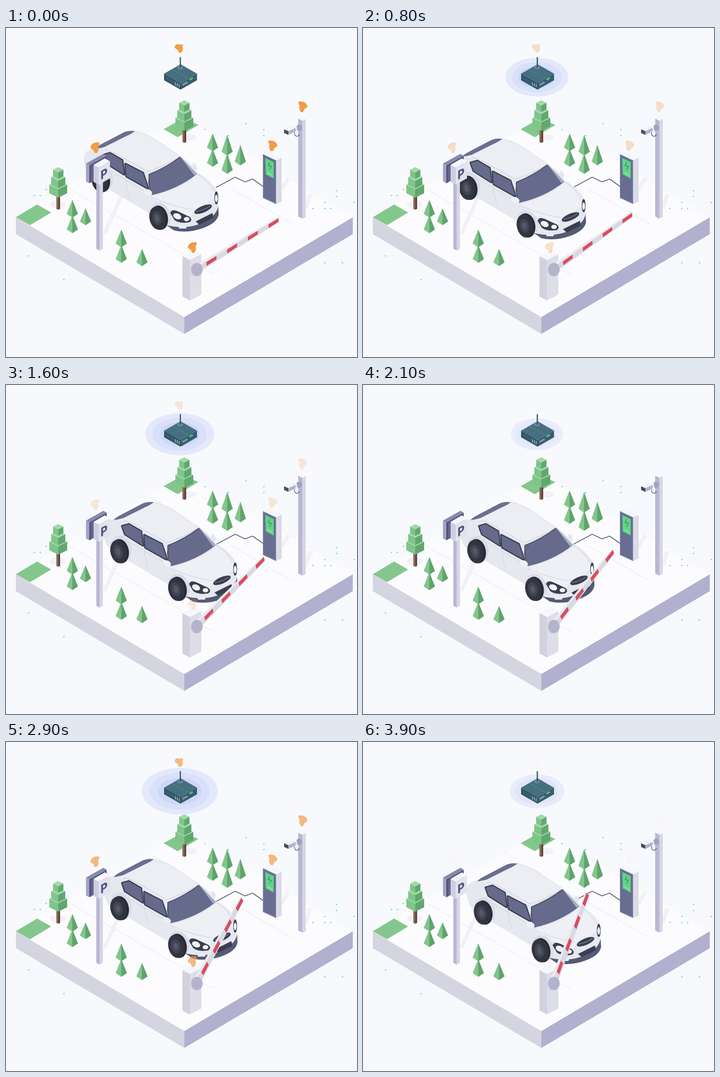
Recreate the animation shown at these times as an HTML page. Size 746 px wide and 699 px high, loop 4 s.

```html
<!DOCTYPE html>
<html lang="en">
<head>
<meta charset="utf-8">
<title>Smart parking</title>
<style>
html, body { margin: 0; width: 100%; height: 100%; overflow: hidden; background: #f7f9fd; }
svg { display: block; width: 746px; height: 699px; }
</style>
</head>
<body>
<svg viewBox="0 0 746 699" xmlns="http://www.w3.org/2000/svg" stroke-linejoin="round">
  <defs><clipPath id="top"><rect y="35" width="746" height="664"/></clipPath></defs>
  <g id="ground"></g>
  <g id="rings"></g>
  <g id="scene"></g>
  <g id="car"></g>
  <g id="posts"></g>
  <g id="arm"></g>
  <g id="hub"></g>
  <g id="waves" clip-path="url(#top)"></g>
</svg>
<script>
const $ = id => document.getElementById(id);
const poly = (pts, fill, more = '') => `<polygon points="${pts}" fill="${fill}" ${more}/>`;
const shape = (d, fill) => `<path d="${d}" fill="${fill}"/>`;
const line = (d, color, w) => `<path d="${d}" fill="none" stroke="${color}" stroke-width="${w}"/>`;
const oval = (x, y, rx, ry, fill, tilt = 0) =>
  `<ellipse cx="${x}" cy="${y}" rx="${rx}" ry="${ry}" fill="${fill}" transform="rotate(${tilt} ${x} ${y})"/>`;
const times = (n, f) => Array.from({ length: n }, (_, i) => f(i)).join('');

// isometric box: (x, y) is the front top corner, a and b the left and right widths, k the slope
function box(x, y, a, b, h, [left, right, top], k = .57) {
  const l = y - a * k, r = y - b * k;
  return poly([x - a, l, x, y, x, y + h, x - a, l + h], left) +
    poly([x, y, x + b, r, x + b, r + h, x, y + h], right) +
    poly([x - a, l, x, y, x + b, r, x + b - a, l - b * k], top);
}

let seed = 7;
const rand = () => (seed = seed * 16807 % 2147483647) / 2147483647;
const dots = (x, y, cols, rows) => times(cols * rows, i => {
  const lit = rand() < .1, r = lit ? 1.5 : 1;
  return oval(x + i % cols * 12.5, y + Math.floor(i / cols) * 12.7, r, r, lit ? '#5fe3c3' : '#eceff5');
});

const GREEN = ['#7fc589', '#61a770', '#a3d9a8'], WOOD = ['#8b6a57', '#60463c', '#60463c'];
const LILAC = ['#b9b7d3', '#d7d6e5', '#f6f6fa'], GRASS = '#84c78d', SHADE = '#f1f1f6';

$('ground').innerHTML =
  dots(48, 484, 9, 5) + dots(640, 448, 9, 6) +
  box(379, 614, 358, 358, 36, ['#d5d5e1', '#b1b0ce', '#fcfcfe'], .592) +
  dots(48, 343, 4, 3) + dots(423, 203, 11, 5) + dots(640, 320, 9, 6) +
  line('M136 343L376 480M302 236L330 252M476 340L612 418M416 512L442 523', SHADE, 2) +
  line('M250 346L209 438M647 353L637 384M600 319L586 343', SHADE, 8) +
  oval(110, 375, 17, 8, SHADE) + oval(391, 232, 14, 7, SHADE) +
  poly('21,402 66,375 96,392 51,419', GRASS) + poly('335,215 376,192 409,206 365,232', GRASS);

$('rings').innerHTML = oval(0, 0, 85, 52, '#e3e8fa') + oval(0, 0, 67, 41, '#d9e0f9') + oval(0, 0, 49, 30, '#cdd7f8');

const tree = (x, y) => box(x, y + 57, 4, 4, 28, WOOD, .4) + times(3, i => {
  const w = 19 - 4 * i;
  return box(x, y + 32 - 16 * i + w / 2, w, w, 18 - 2 * i, GREEN, .5);
});
const cone = (x, y, h) => poly([x, y, x - 12, y + h - 8, x, y + h], '#83c58c') +
  poly([x, y, x + 12, y + h - 8, x, y + h], '#5fa46d');
const pair = (x, y, h) => cone(x, y, h) + cone(x, y + h - 5, h);

$('scene').innerHTML =
  // router
  box(371, 117, 35, 35, 14, ['#2f5566', '#365e6e', '#466f80']) +
  line('M353 87L388 107', '#5d8595', 1) +
  line(times(6, i => `M${341 + i * 3} ${104 + i * 1.7}v6`), '#4d7283', 1) +
  line('M360 115v7M364 117v7M368 119v7', '#b7c9d1', 1.5) +
  line('M375 121L386 115', '#7c98a3', 4) + line('M390 110L397 106', '#66bf72', 3.5) +
  oval(370, 84, 6, 4, '#648a9b') + line('M370.500 62V84', '#384e63', 2.5) +
  tree(111, 301) + tree(379, 159) +
  pair(439, 224, 38) + pair(470, 227, 44) + cone(498, 248, 44) +
  pair(141, 365, 38) + cone(169, 383, 36) + pair(245, 428, 38) + cone(289, 469, 37) +
  line('M446 339L487 317L508 327L524 321L547 337', '#5a5d75', 1.8);

const GLASS = '#666a8b', FRAME = '#3a3e50', LAMP = '#f1f4f7', SEAM = '#d6dae4';
const wheel = (x, y) => oval(x + 4, y - 1, 18, 26, '#282b37', -12) + oval(x, y, 17, 25, '#32353f', -12) +
  oval(x - 1, y, 10, 15, '#414554', -12) + oval(x - 1, y, 5, 8, '#53576a', -12);
const frame = `stroke="${FRAME}" stroke-width="5" paint-order="stroke"`;

$('car').innerHTML =
  shape('M206 304Q207 289 231 284L291 251Q302 246 319 249Q336 252 358 266L411 302Q436 319 447 338Q472 351 484 369Q492 381 491 404L492 424Q490 440 466 450Q430 465 398 460L345 424L224 352Q206 336 206 304Z', '#e5e8ef') +
  shape('M232 286L297 254Q313 249 333 256Q376 278 409 304L343 339L268 298Q252 289 232 286Z', '#eceef4') +
  line('M250 288Q266 291 288 305L342 335Q376 323 407 305', SEAM, 2) +
  shape('M229 287Q232 282 244 276L288 253Q299 247 314 249Q307 255 295 260L249 283Q238 286 229 287Z', '#6b6e90') +
  poly('247,300 261,296 287,311 291,341 253,317', GLASS, frame) +
  poly('294,319 331,338 342,371 296,345', GLASS, frame) +
  shape('M344 341Q380 327 411 304L446 340Q405 373 350 385Q345 372 342 359Z', GLASS) +
  line('M349 384Q343 368 344 341Q380 327 410 304', '#4b4f67', 2) +
  poly('411,304 446,340 440,343', '#a8acc3') +
  shape('M350 388Q420 370 447 341Q477 353 486 386Q475 403 441 414L432 433Q408 416 383 415Z', '#eef0f6') +
  line('M351 389Q381 406 437 416M447 341Q469 352 481 377M246 324L347 384M294 349Q295 367 303 390', SEAM, 1.5) +
  oval(244, 349, 23, 29, '#dadde7', -12) + oval(367, 430, 23, 29, '#dadde7', -12) +
  wheel(239, 354) + wheel(362, 434) +
  shape('M381 449Q424 459 457 444Q487 430 491 409L492 426Q489 444 459 455Q426 467 397 460Z', '#555a75') +
  shape('M389 423Q392 414 404 419L430 431Q438 438 429 443Q409 446 398 438Z', FRAME) +
  oval(404, 430, 9, 6, LAMP, 24) + oval(424, 436, 6, 4.5, LAMP) +
  oval(487, 391, 4, 14, FRAME) + oval(487, 392, 3, 8, LAMP) +
  oval(459, 415, 20, 7, FRAME, -23) + line('M444 420Q461 417 474 408', '#8186a0', 1.5) +
  poly('443,441 479,423 481,433 451,448', FRAME) + poly('406,449 424,449 423,456 408,456', '#e9ecf2') +
  oval(342, 379, 9, 6, '#eef0f5', 24) + oval(441, 324, 4, 8, '#e4e7ef', -24);

$('posts').innerHTML =
  // parking sign
  box(177, 292, 7, 37, 38, ['#a4a2c5', '#56557f', '#8988ad'], .56) + line('M183 293V326', '#7675a0', 2) +
  box(199, 326, 7, 7, 147, LILAC) + box(197, 297, 11, 24, 36, ['#cfcee0', '#e3e2ee', '#f8f8fc']) +
  `<text transform="matrix(.87 -.48 0 1 201 323)" font-family="Inter, sans-serif" font-weight="800" font-size="26" fill="#55547f">P</text>` +
  // camera on its pole
  box(630, 197, 9, 7, 208, LILAC, .5) + oval(623, 212, 6, 7, '#a3a1c2') +
  box(600, 219, 9, 18, 8, ['#4a4d60', '#b4b2ce', '#f4f4f9'], .44) +
  line('M617 211V226', '#eeeef5', 3) + line('M613 222Q613 231 620 230L624 226', '#4a4d60', 1.3) +
  // charger
  box(574, 281, 28, 12, 93, ['#686d91', '#dbdbe6', '#f5f6fa'], .46) +
  line('M547 269L573 282V372L547 360Z', '#7489ad', 1.2) +
  poly('551,276 569,285 569,320 552,311', '#5fd584') +
  line('M561 285L557 292L564 294L560 301', '#45806d', 1.5) + line('M555 307L566 313', '#8ee9a6', 2) +
  // barrier
  box(391, 493, 16, 24, 86, ['#d2d2de', '#dedee8', '#f6f6fb'], .53);

$('arm').innerHTML = poly('8,-9 207,-5 202,5 12,7', '#d9d9e3') + poly('8,-9 207,-5 206,-3 8,-4', '#ececf2') +
  times(4, i => {
    const u = 26 + 51.5 * i;
    return poly([u, -2.5, u + 25, -2.5, u + 21, 4, u - 4, 4.5], '#dc4a5c');
  });
$('hub').innerHTML = oval(403, 514, 11, 14, '#cfcedf') + oval(406, 513, 12, 14, '#b4b3cb');

const wave = (x, y, side) => `<g transform="translate(${x} ${y}) scale(${side} 1)">` +
  shape('M-10 -11Q5 -15 10 -1L6 3L3 4L2 8L-1 11L-5 10L-8 3L-7 -2Z', '#f19a42') +
  line('M-8 -4Q2 -6 6 3M-7 3Q-1 2 1 8', '#f6ad62', 1) + '</g>';
$('waves').innerHTML = wave(368, 42, -1) + wave(631, 168, 1) + wave(567, 251, 1) + wave(189, 255, -1) + wave(396, 467, -1);

const LOOP = 4000, PULSE = 1210;
const clamp = u => Math.max(0, Math.min(1, u));
const ease = u => (u = clamp(u), u * u * (3 - 2 * u));

function draw(t) {
  const go = ease(t / 1500) - 1, leave = ease((t - 3400) / 1500);
  $('car').setAttribute('transform', `translate(${40 * go + 54 * leave} ${30 * go + 36 * leave})`);

  const lift = 38 * clamp((t - 500) / 3000);
  $('arm').setAttribute('transform', `translate(405 513) rotate(${-31.3 - lift})`);

  const swell = .5 - .5 * Math.cos(2 * Math.PI * (t / PULSE + .03));
  $('rings').setAttribute('transform', `translate(369.500 104.500) scale(${.38 + .6 * swell})`);
  $('rings').setAttribute('opacity', clamp(1.5 * swell - .02));
  $('waves').setAttribute('opacity', clamp(.55 * (1 + Math.cos(4 * Math.PI * t / PULSE)) - .01));
}

function tick(now) {
  draw(Math.floor(now % LOOP / 100) * 100);
  requestAnimationFrame(tick);
}
draw(0);
requestAnimationFrame(tick);
</script>
</body>
</html>
```
